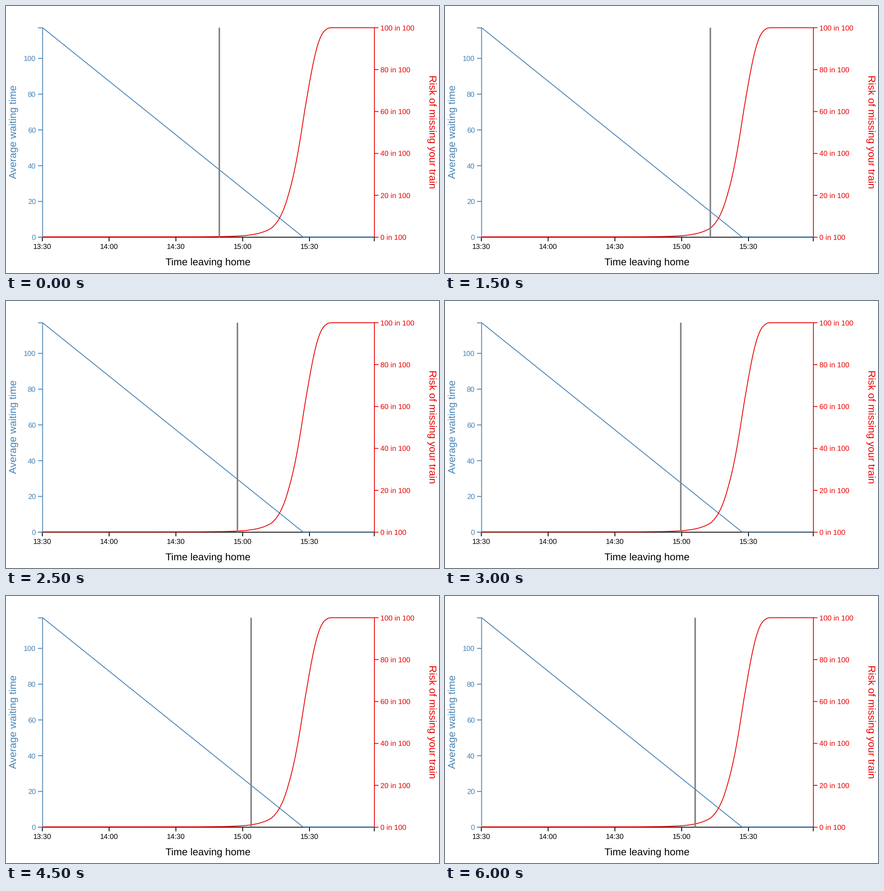
A matplotlib script that plays this animation: 953 px wide and 588 px high, repeating every 8000 ms.

```python
import numpy as np
import matplotlib.pyplot as plt
from matplotlib.animation import FuncAnimation

W, H, DPI = 953, 588, 64
PT = 72 / DPI  # points per pixel
BLUE, RED, GRAY = "steelblue", "#ea0000", "#808080"
LEFT, RIGHT, TOP, BOTTOM = 80.5, 810.8, 47.8, 508.5
AXIS = BOTTOM + 0.7
LINE, TICK = 1.8, 10

plt.rcParams.update({
    "font.family": "Liberation Sans",
    "text.hinting": "none",
    "path.snap": False,
    "toolbar": "None",
})

fig = plt.figure(figsize=(W / DPI, H / DPI), dpi=DPI, facecolor="white")
ax = fig.add_axes([0, 0, 1, 1])
ax.set(xlim=(0, W), ylim=(H, 0))
ax.axis("off")


def stroke(xs, ys, color, width=LINE, **kw):
    return ax.plot(xs, ys, color=color, lw=width * PT,
                   solid_capstyle="butt", solid_joinstyle="round", **kw)[0]


def label(x, y, text, color, size=16, ha="center", rotation=0):
    ax.text(x, y, text, color=color, fontsize=size * PT, ha=ha,
            va="baseline", rotation=rotation, rotation_mode="anchor")


def risk(x):
    """Chance of missing the train: 1 - exp(-hazard), log hazard bent at a few points."""
    log_hazard = np.interp(x, [380, 521, 584.5, 622, 657, 705, 719],
                           [-9, -5.2, -3.14, -1.47, -0.09, 1.57, 2.3])
    return 1 - np.exp(-np.exp(log_hazard))


def cursor_x(frame):
    """Sweep to the right, jump back, then drift forward with two hesitations."""
    if frame < 4:
        t = frame / 3
        return 469.5 + 114.5 * (1 - (1 - t * t) ** 4.1)
    return np.interp(frame, [4, 7, 8, 10, 11, 12],
                     [499.8, 528.5, 530, 549, 542.3, 550.6])


# Time axis
stroke([LEFT, RIGHT], [AXIS, AXIS], "black")
for half_hour in range(6):
    x = min(79.9 + 147 * half_hour, RIGHT - 0.3)
    stroke([x, x], [AXIS, AXIS + TICK - 1], "black")
    if half_hour < 5:
        minutes = 13 * 60 + 30 * (half_hour + 1)
        label(x - 0.2, 534.7, f"{minutes // 60}:{minutes % 60:02}", "black")
label(445, 571, "Time leaving home", "black", 22.3)

# Waiting time axis
stroke([LEFT - TICK, LEFT, LEFT, LEFT - TICK],
       [TOP + 0.4, TOP + 0.4, AXIS, AXIS], BLUE)
for value in range(0, 101, 20):
    y = AXIS - 3.938 * value
    stroke([LEFT - TICK, LEFT], [y, y], BLUE)
    label(65.6, y + 5.7, str(value), BLUE, ha="right")
label(23.8, 277.3, "Average waiting time", BLUE, 22.3, rotation=90)

# Risk axis
stroke([RIGHT, RIGHT], [TOP, AXIS], RED)
for value in range(0, 101, 20):
    y = AXIS - (AXIS - TOP) * value / 100
    stroke([RIGHT, RIGHT + TICK - 1], [y, y], RED)
    label(824, y + 5.6, f"{value} in 100", RED, ha="left")
label(931, 276.8, "Risk of missing your train", RED, 22.4, rotation=-90)

# Curves
stroke([LEFT, 653.5, RIGHT], [TOP, BOTTOM, BOTTOM], BLUE)
x = np.linspace(LEFT, RIGHT, 1000)
stroke(x, BOTTOM - (BOTTOM - TOP) * risk(x), RED)

cursor = stroke([cursor_x(0)] * 2, [TOP, AXIS], GRAY, 3.3, zorder=5)


def update(frame):
    cursor.set_xdata([cursor_x(frame)] * 2)
    return cursor,


anim = FuncAnimation(fig, update, frames=16, interval=500, repeat=True,
                     repeat_delay=0, blit=False)
plt.show()
```
